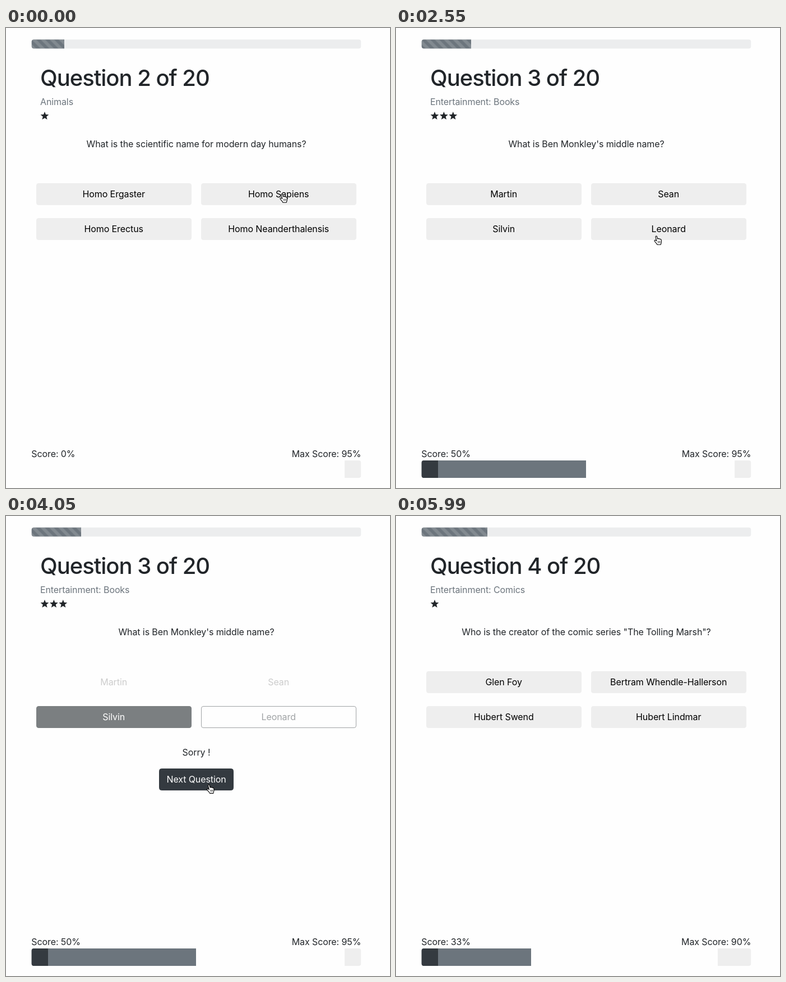
Recreate the animation shown at these times as an HTML page. Size 685x818 px, loop 6090 ms.

```html
<!DOCTYPE html>
<html lang="en">
<head>
<meta charset="utf-8">
<title>Quiz</title>
<style>
html, body { margin: 0; width: 100%; height: 100%; overflow: hidden; background: #fefefe; }
svg { display: block; width: 100%; height: 100%; }
text { font: 16px Inter, "Liberation Sans", sans-serif; letter-spacing: -0.1px; fill: #212529; font-optical-sizing: none; }
.title { font-size: 40px; font-weight: 500; letter-spacing: -1.03px; }
.mid { text-anchor: middle; }
.end { text-anchor: end; }
.muted { fill: #6c757d; }
</style>
</head>
<body>
<svg id="stage" viewBox="0 0 685 818" xmlns="http://www.w3.org/2000/svg">
  <defs>
    <pattern id="stripes" width="16" height="16" patternUnits="userSpaceOnUse">
      <path d="M0 8V16H8ZM0 0H8L16 8V16Z" fill="#fff" fill-opacity=".15"/>
    </pattern>
    <clipPath id="topClip"><rect x="45.7" y="20.5" width="587.6" height="16" rx="4"/></clipPath>
    <clipPath id="scoreClip"><rect x="45.7" y="769" width="587.6" height="31" rx="4"/></clipPath>
  </defs>
  <rect width="685" height="818" fill="#fefefe"/>
  <g clip-path="url(#topClip)">
    <rect x="45" y="20" width="589" height="17" fill="#ecedee"/>
    <rect id="fill" x="45" y="20" height="17" fill="#6c757d"/>
    <rect id="striped" x="45" y="20" height="17" fill="url(#stripes)"/>
  </g>
  <text id="title" class="title" x="61" y="102.5"></text>
  <text id="topic" class="muted" x="61" y="137"></text>
  <g id="stars" fill="#212529"></g>
  <text id="ask" class="mid" x="339.5" y="212"></text>
  <g id="answers"></g>
  <g id="result">
    <text id="verdict" class="mid" x="339.5" y="425.5"></text>
    <rect id="nextBox" x="273.5" y="449.5" width="132" height="38" rx="4" stroke="#343a40"/>
    <text id="nextText" class="mid" x="339.5" y="474">Next Question</text>
  </g>
  <text id="score" x="45.3" y="763"></text>
  <text id="max" class="end" x="633.3" y="763"></text>
  <g clip-path="url(#scoreClip)">
    <rect id="earned" x="45" y="769" height="31" fill="#6c757d"/>
    <rect id="sure" x="45" y="769" height="31" fill="#343a40"/>
    <rect id="lost" y="769" height="31" fill="#eee"/>
  </g>
  <g id="hand" stroke="#000" stroke-linejoin="round" stroke-linecap="round">
    <path fill="#fff" stroke-width="1.1" d="M4.8 9.5L3 2.6C2.7 1 5 .4 5.5 2L6.6 6C7.2 5 8.6 5.2 8.9 6.2C9.6 5.4 10.9 5.7 11.1 6.8C12 6.2 13.2 6.8 13.3 8L13.5 11C13.5 13 12.6 14 12.3 16.3H6C5.6 14.5 2.2 11.8 1.2 10C.4 8.6 2 7.6 3.2 8.6Z"/>
    <path fill="none" stroke-width=".7" d="M7.3 10.2L7.6 13M9.2 10.1L9.4 12.9M11.1 10L11.2 12.8"/>
  </g>
  <path id="arrow" d="M0 0V12.2L2.8 9.6L4.7 14.1L6.6 13.3L4.7 8.9H8.5Z" fill="#000" stroke="#fff" stroke-width="1.2" paint-order="stroke"/>
</svg>
<script>
const LOOP = 6090, LAST = 5990, STEP = 150;
const LEFT = 45.7, WIDTH = 587.3;

// from: when it appears, press/answer: the click, hover: pointer reaches the next button
const questions = [
  { from: -9e3, press: 290, answer: 440, hover: 1050, topic: "Animals", stars: 1,
    ask: "What is the scientific name for modern day humans?",
    options: ["Homo Ergaster", "Homo Sapiens", "Homo Erectus", "Homo Neanderthalensis"],
    right: 1, picked: 1, verdict: "Correct !", score: 0, max: 95, bars: [0, 0, 95] },
  { from: 1700, press: 2800, answer: 2960, hover: 3600, topic: "Entertainment: Books", stars: 3,
    ask: "What is Ben Monkley's middle name?",
    options: ["Martin", "Sean", "Silvin", "Leonard"],
    right: 2, picked: 3, verdict: "Sorry !", score: 50, max: 95, bars: [5, 50, 95] },
  { from: 4150, press: 9e3, answer: 9e3, hover: 9e3, topic: "Entertainment: Comics", stars: 1,
    ask: "Who is the creator of the comic series \"The Tolling Marsh\"?",
    options: ["Glen Foy", "Bertram Whendle-Hallerson", "Hubert Swend", "Hubert Lindmar"],
    right: 3, picked: -1, verdict: "", score: 33, max: 90, bars: [5, 33.2, 90] }
];

// pointer tip: time, x, y
const track = [
  [0, 492, 295], [300, 492, 296], [450, 489, 300], [1050, 394, 480], [1350, 369, 474],
  [1800, 368.5, 475], [1950, 371, 470], [2550, 464, 370], [2850, 470, 362], [3000, 469, 364],
  [3600, 351, 485], [3900, 361.5, 478], [4350, 361.5, 477.5], [4650, 430, 525],
  [5250, 677, 740], [5400, 680, 790], [5550, 683, 812]
];

const $ = id => document.getElementById(id);
const set = (el, attrs) => { for (const k in attrs) el.setAttribute(k, attrs[k]); };
const make = (tag, parent, attrs) => {
  const el = document.createElementNS("http://www.w3.org/2000/svg", tag);
  set(el, attrs);
  return parent.appendChild(el);
};
const clamp = v => Math.max(0, Math.min(1, v));
const lerp = (a, b, k) => a + (b - a) * k;
const mix = (a, b, k) => `rgb(${a.map((v, i) => Math.round(lerp(v, b[i], k)))})`;

// cubic-bezier(.25, .1, .25, 1)
function ease(x) {
  x = clamp(x);
  let lo = 0, hi = 1;
  for (let i = 0; i < 24; i++) {
    const s = (lo + hi) / 2;
    if (0.75 * s * (1 - s) + s ** 3 < x) lo = s; else hi = s;
  }
  const s = lo, r = 1 - s;
  return 0.3 * s * r * r + 3 * s * s * r + s ** 3;
}

const grey = v => [v, v, v];
const dark = [123, 127, 129], dim = [160, 163, 165];
const rest = { bg: grey(238), edge: grey(238), ink: grey(0) };
function answered(q, i) {
  if (i === q.right) return { bg: dark, edge: dark, ink: grey(255) };
  if (i === q.picked) return { bg: grey(254), edge: dim, ink: dim };
  return { bg: grey(254), edge: grey(254), ink: grey(204) };
}

const star = Array.from({ length: 10 }, (_, i) => {
  const r = i % 2 ? 3.4 : 7.8, a = (i / 5 - 0.5) * Math.PI;
  return (r * Math.cos(a)).toFixed(2) + "," + (r * Math.sin(a)).toFixed(2);
}).join(" ");
const stars = [0, 1, 2].map(i =>
  make("polygon", $("stars"), { points: star, transform: `translate(${69 + i * 16.4} 156.5)` }));

const buttons = [0, 1, 2, 3].map(i => {
  const x = i % 2 ? 348 : 54, y = i < 2 ? 276 : 338;
  const ring = make("rect", $("answers"),
    { x: x - 3.2, y: y - 3.2, width: 283.4, height: 45.4, rx: 7, fill: "#bfdeff" });
  const box = make("rect", $("answers"),
    { x: x + 0.5, y: y + 0.5, width: 276, height: 38, rx: 3.5 });
  const label = make("text", $("answers"), { class: "mid", x: x + 138.2, y: y + 25 });
  return { ring, box, label };
});

const show = (el, on) => { el.style.display = on ? "" : "none"; };

function drawButtons(t, q, prev) {
  buttons.forEach(({ ring, box, label }, i) => {
    let a = rest, b = answered(q, i), k = ease((t - q.answer) / 120), edgeK = k;
    if (t < q.answer) {
      a = prev ? answered(prev, i) : rest;
      b = rest;
      k = ease((t - q.from - 37) / 150);
      edgeK = k ** 3;
    }
    set(box, { fill: mix(a.bg, b.bg, k), stroke: mix(a.edge, b.edge, edgeK) });
    label.style.fill = mix(a.ink, b.ink, k);
    label.textContent = q.options[i];
    show(ring, i === q.picked && t >= q.press && t < q.answer);
  });
}

function drawBars(t, n, q, prev) {
  const age = t - q.from;
  const slide = age < 60 ? 0 : ease(age / 600);
  const grow = age < 60 ? 0 : ease((age - 18) / 600);
  // bar edges sit on whole pixels
  const edge = share => Math.round(LEFT + WIDTH * share);
  const bar = j => edge(lerp(prev ? prev.bars[j] : q.bars[j], q.bars[j], slide) / 100);
  const done = edge(0.05 * (n + 1 + grow)) - 45;
  set($("fill"), { width: done });
  set($("striped"), { width: done });
  set($("stripes"), { patternTransform: `translate(${LEFT - t / 1000 % 1 * 16} 20.5)` });
  set($("sure"), { width: q.bars[0] ? bar(0) - 45 : 0 });
  set($("earned"), { width: q.bars[1] ? bar(1) - 45 : 0 });
  set($("lost"), { x: bar(2), width: 634 - bar(2) });
}

function drawPointer(t, q) {
  let i = 0;
  while (i < track.length - 2 && t >= track[i + 1][0]) i++;
  const [t0, x0, y0] = track[i], [t1, x1, y1] = track[i + 1];
  const u = clamp((t - t0) / (t1 - t0)), k = u * u * (3 - 2 * u);
  const x = lerp(x0, x1, k), y = lerp(y0, y1, k);
  const overAnswer = t < q.answer && x > 348 && x < 625 && y > 276 && y < 377;
  const point = overAnswer || t >= q.hover;
  show($("hand"), point);
  show($("arrow"), !point && t < 5700);
  set($("hand"), { transform: `translate(${x - 4} ${y - 1})` });
  set($("arrow"), { transform: `translate(${x} ${y})` });
}

function draw(time) {
  const t = time >= LAST ? LAST : Math.floor(time / STEP) * STEP;
  const n = questions.filter(q => t > q.from).length - 1;
  const q = questions[n], prev = questions[n - 1];

  $("title").textContent = `Question ${n + 2} of 20`;
  $("topic").textContent = q.topic;
  $("ask").textContent = q.ask;
  $("score").textContent = `Score: ${q.score}%`;
  $("max").textContent = `Max Score: ${q.max}%`;
  stars.forEach((s, i) => show(s, i < q.stars));

  show($("result"), t >= q.answer);
  $("verdict").textContent = q.verdict;
  const hover = ease((t - q.hover) / 150);
  set($("nextBox"), { fill: mix(grey(254), [52, 58, 64], hover) });
  $("nextText").style.fill = mix([52, 58, 64], grey(255), hover);

  drawButtons(t, q, prev);
  drawBars(t, n, q, prev);
  drawPointer(t, q);
}

const start = performance.now();
function tick() {
  draw((performance.now() - start) % LOOP);
  requestAnimationFrame(tick);
}
tick();
</script>
</body>
</html>
```
